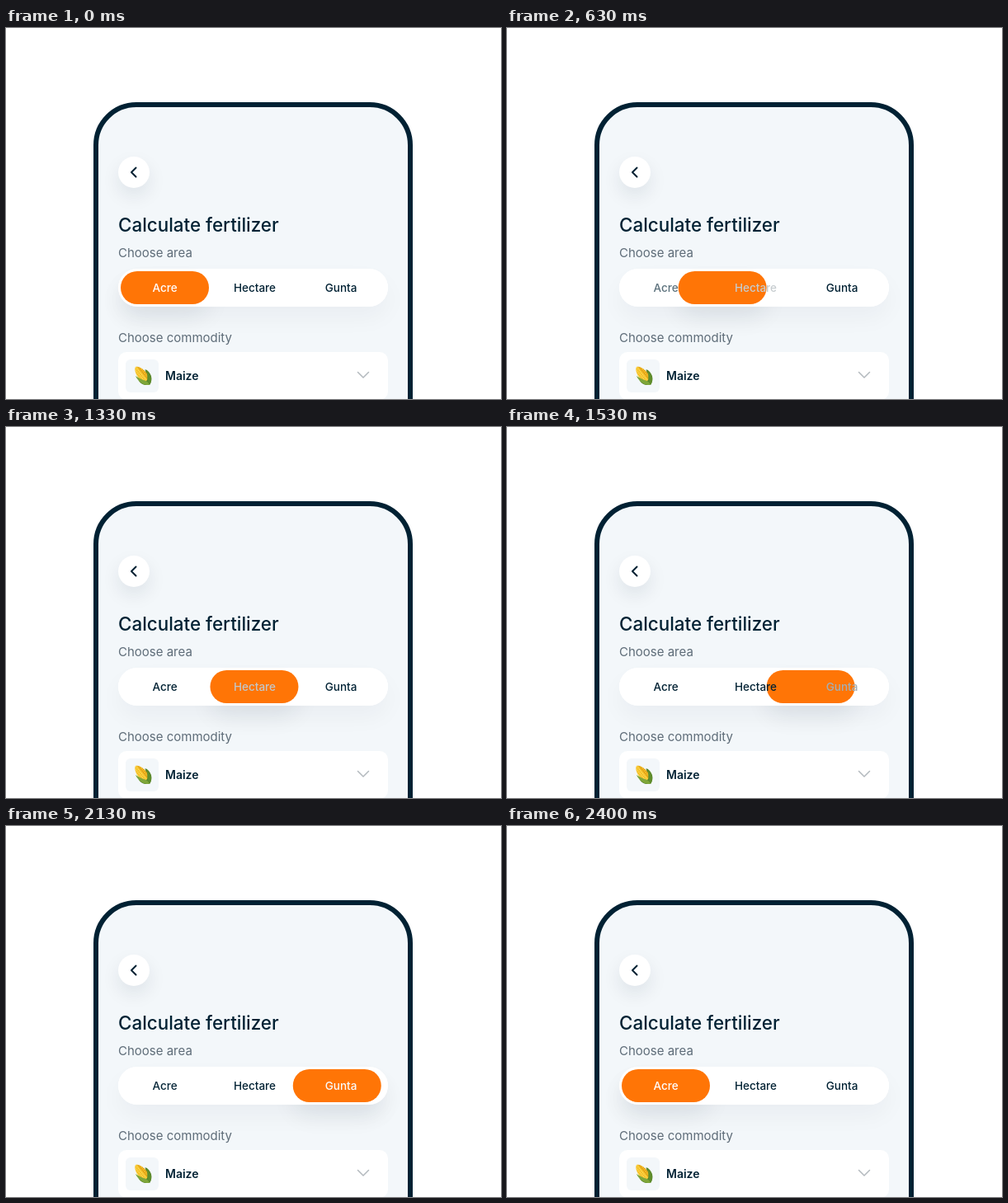
An HTML page with a canvas that plays this animation: 600x450 px, repeating every 2430 ms.

```html
<!DOCTYPE html>
<html lang="en">
<head>
<meta charset="utf-8">
<title>Calculate fertilizer</title>
<style>
html, body { margin: 0; width: 100%; height: 100%; overflow: hidden; background: #fff; }
canvas { display: block; }
</style>
</head>
<body>
<canvas id="stage" width="600" height="450"></canvas>
<script>
const ctx = document.getElementById('stage').getContext('2d');
const LOOP = 2430;
const INK = [0, 33, 51], WHITE = [255, 255, 255], MIST = [198, 204, 207];
const PAPER = '#f3f7fa';

const rgb = c => `rgb(${c.map(Math.round).join(',')})`;
const lerp = (a, b, p) => a + (b - a) * p;
const mix = (a, b, p) => a.map((v, i) => lerp(v, b[i], p));
const clamp = v => Math.min(1, Math.max(0, v));

// cubic-bezier(.42, 0, .58, 1)
function easeInOut(x) {
  let lo = 0, hi = 1;
  for (let i = 0; i < 24; i++) {
    const s = (lo + hi) / 2, r = 1 - s;
    if (1.26 * s * r * r + 1.74 * s * s * r + s * s * s < x) lo = s; else hi = s;
  }
  return lo * lo * (3 - 2 * lo);
}

const progress = (t, start, length) => easeInOut(clamp((t - start) / length));

function box(x, y, w, h, r, fill) {
  ctx.beginPath();
  ctx.roundRect(x, y, w, h, r);
  ctx.fillStyle = fill;
  ctx.fill();
}

function withShadow(dy, blur, alpha, draw) {
  ctx.save();
  ctx.shadowColor = `rgba(0,33,51,${alpha})`;
  ctx.shadowOffsetY = dy;
  ctx.shadowBlur = blur;
  draw();
  ctx.restore();
}

function label(str, x, y, size, weight, color, align = 'left') {
  ctx.font = `${weight} ${size}px Poppins, Inter, sans-serif`;
  ctx.textAlign = align;
  ctx.fillStyle = color;
  ctx.fillText(str, x, y);
}

function chevron(points, width, color) {
  ctx.beginPath();
  points.forEach(([x, y]) => ctx.lineTo(x, y));
  ctx.lineWidth = width;
  ctx.lineCap = ctx.lineJoin = 'round';
  ctx.strokeStyle = color;
  ctx.stroke();
}

function shape(path, fill) {
  ctx.fillStyle = fill;
  ctx.fill(new Path2D(path));
}

function phone() {
  ctx.beginPath();
  ctx.roundRect(109, 93, 381, 480, 49);
  ctx.fillStyle = PAPER;
  ctx.fill();
  ctx.lineWidth = 6;
  ctx.strokeStyle = rgb(INK);
  ctx.stroke();
}

function backButton() {
  withShadow(10, 22, 0.09, () => box(136, 156, 38, 38, 19, '#fff'));
  chevron([[157.5, 169.5], [152, 175], [157.5, 180.5]], 2, rgb(INK));
}

function corn() {
  ctx.save();
  ctx.translate(165.5, 421.5);
  ctx.rotate(-0.68);
  shape('M-6 -2 C-10 5 -6 12 0 14 C7 12 11 4 7 -4 C5 4 -4 5 -6 -2Z', '#4d7a25');
  const cob = new Path2D('M-5.5 4 C-6.5 -4 -4 -12 0 -13.5 C4 -12 6.5 -4 5.5 4 C4 9 -4 9 -5.5 4Z');
  ctx.fillStyle = '#f3bd25';
  ctx.fill(cob);
  ctx.save();
  ctx.clip(cob);
  for (let row = -6; row < 5; row++) {
    for (let col = -2; col < 3; col++) {
      box(col * 2.5 - 0.8, row * 2.2, 1.6, 1.5, 0.7, col > 0 ? '#d99413' : '#ffdc57');
    }
  }
  ctx.restore();
  shape('M-7 -5 C-9 4 -6 12 0 14 C2 8 -4 6 -7 -5Z', '#7fa63a');
  shape('M8 -3 C10 5 6 12 0 14 C-2 8 5 6 8 -3Z', '#5f8d2c');
  ctx.restore();
}

function commodity() {
  label('Choose commodity', 136, 381, 15, 400, '#5e6c78');
  box(136, 393, 327, 58, 10, '#fff');
  box(145, 402, 40, 40, 6, PAPER);
  corn();
  label('Maize', 193, 426.5, 14, 600, rgb(INK));
  chevron([[426.5, 417.5], [433, 424], [439.5, 417.5]], 1.5, '#b3b9be');
}

function areaSwitch(t) {
  const a = progress(t, 400, 400);
  const b = progress(t, 1300, 400);
  const c = progress(t, 2100, 300);
  const x = 139 + 107 * (a + b) - 214 * c;

  withShadow(14, 28, 0.04, () => box(136, 292, 327, 46, 23, '#fff'));
  withShadow(16, 28, 0.08, () => box(x, 295, 107, 40, 20, '#fff'));
  box(136, 292, 327, 46, 23, '#fff');
  box(x, 295, 107, 40, 20, '#ff7506');

  const tab = (str, cx, from, to, p) =>
    label(str, cx, 320, 13.5, 500, rgb(mix(from, to, p)), 'center');
  tab('Acre', 192.5, WHITE, INK, a - c);
  tab('Hectare', 301.5, INK, MIST, clamp(2 * a) - clamp(2 * b));
  tab('Gunta', 406, INK, WHITE, b - c);
}

function draw(t) {
  ctx.fillStyle = '#fff';
  ctx.fillRect(0, 0, 600, 450);
  phone();
  backButton();
  label('Calculate fertilizer', 136, 247, 22.4, 500, rgb(INK));
  label('Choose area', 136, 278, 15, 400, '#5e6c78');
  areaSwitch(t);
  commodity();
}

// thirty steps a second, on a 10 ms grid
function tick() {
  const now = Math.floor(performance.now() % LOOP / 10);
  draw(Math.floor((now + 0.5) * 0.3) / 0.03);
  requestAnimationFrame(tick);
}
tick();
</script>
</body>
</html>
```
